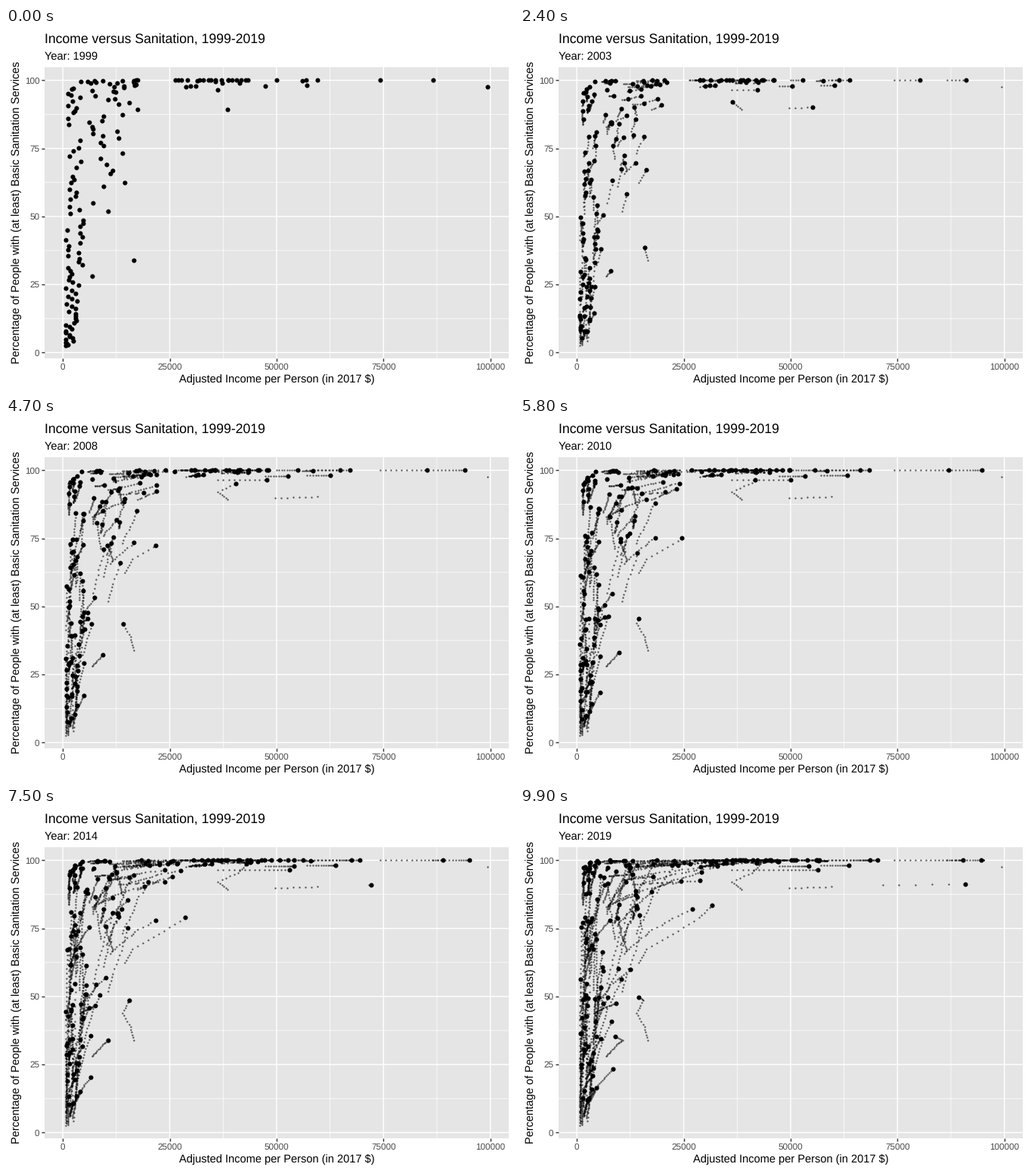
Animation, 672 px wide and 480 px high, one loop 10 s. Source, as a matplotlib script:

```python
import numpy as np
import matplotlib.pyplot as plt
from matplotlib.animation import FuncAnimation

W, H, DPI = 672, 480, 96
FRAMES, FIRST, SPAN = 100, 1999, 20
LEFT, RIGHT, TOP, BOTTOM = 51, 664.67, 52, 438
X0, Y0 = 75.2, 430.4          # pixel position of the data origin
KX, KY = 5.655, 3.61          # pixels per 1000 $ and per percent

plt.rcParams["font.family"] = "Liberation Sans"
plt.rcParams["text.hinting"] = "none"
rng = np.random.default_rng(11)
years = np.arange(SPAN + 1)

# Stray paths: (income in thousands, percent) every five years
STRAYS = [
    [(16.6, 34), (15.8, 38.8), (14, 44), (15.5, 48.6), (14.5, 49.8)],
    [(6.8, 28), (8, 30), (9.4, 32.4), (10.7, 34), (8.9, 35.3)],
    [(14.5, 62.4), (16.2, 67.3), (22.4, 73), (28.6, 79), (31.6, 83.5)],
    [(10.6, 51.9), (11.6, 58.4), (13.7, 67), (15.1, 75), (14.6, 80)],
    [(38.6, 89.2), (36.3, 92.2), (41, 95.5), (43, 98.7), (42, 99)],
]
# Richest countries: first income, last income, percent
RICH = [(86.7, 94.5, 100), (74.2, 90.4, 100), (59.5, 70.3, 100),
        (56.9, 68.6, 100), (56, 56.5, 99.8), (50, 56.2, 100),
        (57.1, 63.6, 98.1), (47.4, 54.2, 97.8), (36.3, 56.4, 96.6)]

tracks = []


def add(x, y):
    tracks.append((x + 0 * years, np.minimum(y + 0 * years, 100)))


def grow(x, y, rate, gain):
    """Compound income growth; the gap to 100 percent closes by the share gain."""
    slump = 1 - .03 * np.exp(-((years - 10.5) / 1.2) ** 2)
    wobble = 1 + rng.normal(0, .008, SPAN + 1) * (years > 0)
    add(x * (1 + rate) ** years * slump * wobble, y + (100 - y) * gain * years / SPAN)


def rate(mean, spread):
    return np.clip(rng.normal(mean, spread), -.01, .05)


def build():
    for path in STRAYS:
        px, py = zip(*path)
        add(np.interp(years, years[::5], px), np.interp(years, years[::5], py))
    for start, end, y in RICH:
        hump = 1 + .04 * np.sin(np.pi * years / SPAN)
        add((start + (end - start) * years / SPAN) * hump, y)

    # poor countries, in a steep column
    for u in np.linspace(0, 1, 51):
        y = 2.7 + 46 * u ** 1.35
        x = .6 + (1.8 + .07 * y) * rng.random() ** 1.3
        grow(x, y, rate(.025, .018), .04 + .6 * rng.random() ** 1.6)
    # middle group, thicker and wider towards the top
    for u in np.linspace(0, 1, 74):
        y = 100 - 49 * u ** 2
        widest = np.interp(y, [50, 75, 100], [5, 16, 19])
        x = 1.2 + (widest - 1.2) * rng.random() ** 1.3
        grow(x, y, rate(.025, .016), rng.uniform(.1, .95))
    # wealthy band
    for x in np.linspace(26.3, 43.5, 24):
        low = 97.3 if x < 31 else 98.8
        y = rng.choice([100, rng.uniform(low, low + 1)])
        grow(x + rng.uniform(-.4, .4), y, rng.uniform(.005, .02), .5)

    # known only in some years
    broken = np.full(SPAN + 1, np.nan)
    broken[1:9] = np.linspace(49.7, 59.5, 8)
    broken[15:] = np.linspace(71.5, 90.9, 6)
    add(broken, 89.7 + .08 * years)
    add(np.where(years == 0, 99.3, np.nan), 97.7)


build()
X, Y = np.array(tracks).swapaxes(0, 1)

fig = plt.figure(figsize=(W / DPI, H / DPI), dpi=DPI, facecolor="white")
ax = fig.add_axes([LEFT / W, 1 - BOTTOM / H, (RIGHT - LEFT) / W, (BOTTOM - TOP) / H])
ax.set_facecolor("#e5e5e5")
ax.set_xlim((LEFT - X0) / KX, (RIGHT - X0) / KX)
ax.set_ylim((Y0 - BOTTOM) / KY, (Y0 - TOP) / KY)
ax.spines[:].set_visible(False)
ax.set_xticks(range(0, 101, 25), labels=[])
ax.set_yticks(range(0, 101, 25), labels=[])
ax.tick_params(length=2.75, width=1.07, color="#333333")
ax.set_axisbelow(True)

for v in np.arange(0, 101, 12.5):
    style = dict(color="white", lw=.53 if v % 25 else 1.07, zorder=.5, snap=False)
    ax.axvline(v, **style)
    ax.axhline(v, **style)


def label(x, y, s, size=11, color="black", **kw):
    """Text with its baseline at a pixel position counted from the top left."""
    return fig.text(x / W, 1 - y / H, s, size=size, color=color, va="baseline", **kw)


label(50.7, 20, "Income versus Sanitation, 1999-2019", 13.2)
subtitle = label(50.7, 42, "")
label((LEFT + RIGHT) / 2, 470, "Adjusted Income per Person (in 2017 $)", ha="center")
label(18, 245, "Percentage of People with (at least) Basic Sanitation Services",
      ha="center", rotation=90, rotation_mode="anchor")
for v in range(0, 101, 25):
    label(X0 + v * KX, 453, str(v * 1000), 8.8, "#4d4d4d", ha="center")
    label(44.4, Y0 - v * KY + 4.2, str(v), 8.8, "#4d4d4d", ha="right")

trail, = ax.plot([], [], "o", ms=1.75, mew=0, color="black", alpha=.65, zorder=2)
dots, = ax.plot([], [], "o", ms=4.6, mew=0, color="black", zorder=3)


def between(values, t):
    k = int(t)
    if t == k:
        return values[:, k]
    return values[:, k] + (values[:, k + 1] - values[:, k]) * (t - k)


def draw(i):
    t = SPAN * i / (FRAMES - 1)
    past = years < t
    trail.set_data(X[:, past].ravel(), Y[:, past].ravel())
    dots.set_data(between(X, t), between(Y, t))
    subtitle.set_text(f"Year: {FIRST + int(t)}")
    return trail, dots, subtitle


anim = FuncAnimation(fig, draw, frames=FRAMES, interval=100, repeat=True, repeat_delay=0)
plt.show()
```
